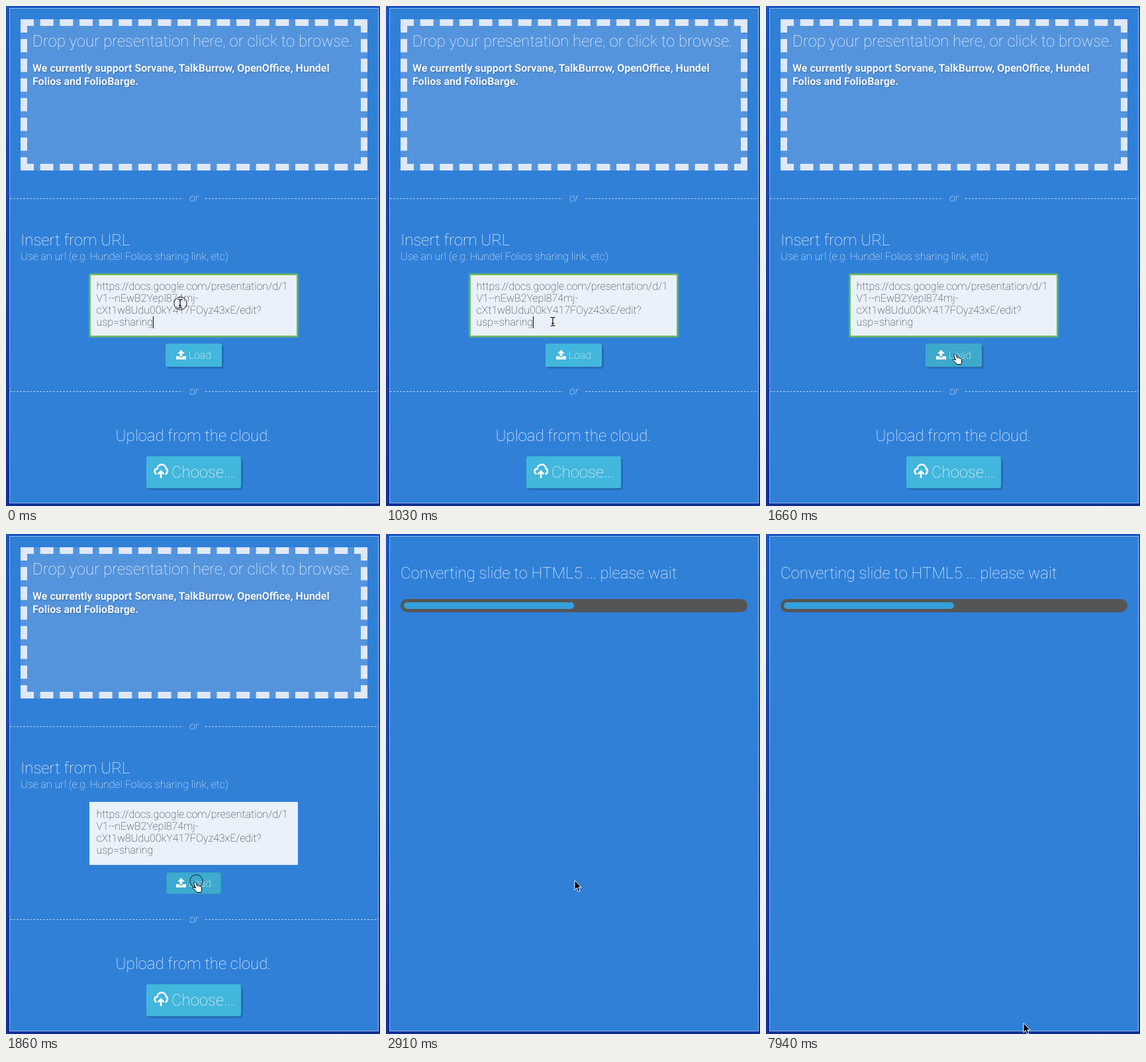
Animation, 565 px wide and 754 px high, one loop 8000 ms. Source, as an HTML page:

```html
<!DOCTYPE html>
<html lang="en">
<head>
<meta charset="utf-8">
<title>Presentation import</title>
<style>
html, body { margin: 0; width: 100%; height: 100%; overflow: hidden; }
body { background: linear-gradient(#1753be, #0f2f94); }
div, svg { position: absolute; box-sizing: border-box; }
#panel { left: 5px; top: 3px; width: 558px; height: 747px; background: #3080d8; border: 1px solid #8fbaec; }
#drop { left: 22px; top: 20px; width: 524px; height: 228px; background: #5494dd; border: 10px dashed #dfe9f7; }
#url { left: 126px; top: 404px; width: 315px; height: 95px; background: #eaf1fb; }
#url.focus { border: 2px solid #72bd5c; box-shadow: 0 0 3px #72bd5c; }
.button { background: #42b6dc; border-radius: 3px; box-shadow: 3px 3px 1px rgba(0, 0, 0, .15); }
#load { left: 241px; top: 509px; width: 85px; height: 35px; }
#load.hover { background: #3ea9cc; }
#load.press { left: 242px; top: 510px; width: 83px; height: 33px; background: #3dabd0; box-shadow: inset 0 0 2px rgba(0, 0, 0, .3); }
#choose { left: 212px; top: 679px; width: 143px; height: 48px; }
#track { left: 22px; top: 98px; width: 524px; height: 20px; border-radius: 10px; background: #555; }
#bar { left: 5px; top: 5px; height: 10px; border-radius: 5px; background: #34a1dc; }
svg { left: 0; top: 0; }
text { font: 100 16px Roboto, sans-serif; fill: #fff; text-rendering: geometricPrecision; }
.big { font-size: 24px; }
.bold { font-weight: 700; fill: #f2f7fd; filter: drop-shadow(1px 1px 1px rgba(0, 0, 0, .25)); }
.or { font-style: italic; text-anchor: middle; }
.dark text { fill: #222; }
</style>
</head>
<body>
<div id="panel"></div>

<section id="form">
  <div id="drop"></div>
  <div id="url"></div>
  <div id="load" class="button"></div>
  <div id="choose" class="button"></div>
  <svg width="565" height="754">
    <text class="big" x="40" y="61">Drop your presentation here, or click to browse.</text>
    <text class="bold" x="40" y="99">We currently support Sorvane, TalkBurrow, OpenOffice, Hundel</text>
    <text class="bold" x="40" y="119">Folios and FolioBarge.</text>
    <path d="M6 290.5H267M301 290.5H562M6 581.5H267M301 581.5H562" stroke="#b5d1f2" stroke-dasharray="3 2"/>
    <text class="or" x="284" y="295">or</text>
    <text class="or" x="284" y="586">or</text>
    <text class="big" x="22" y="361">Insert from URL</text>
    <text x="22" y="383">Use an url (e.g. Hundel Folios sharing link, etc)</text>
    <g class="dark">
      <text x="136.5" y="428">https://docs.google.com/presentation/d/1</text>
      <text x="136.5" y="446">V1--nEwB2Yepl874mj-</text>
      <text x="136.5" y="464">cXt1w8Udu00kY417FOyz43xE/edit?</text>
      <text x="136.5" y="482">usp=sharing</text>
    </g>
    <rect id="caret" x="222" y="468" width="1" height="18"/>
    <path d="M264.5 518.5L270 524H266.5V528H262.5V524H259ZM257 528H261.5V529.5H267.5V528H272V533H257Z" fill="#fff"/>
    <text x="276" y="532">Load</text>
    <text class="big" x="283" y="656" text-anchor="middle">Upload from the cloud.</text>
    <path d="M227.5 706C223 704 223.500 698 228.500 698C229 690 240 689 241.500 697C245 699 244.500 705 240.500 706M234 712V702M229.500 706L234 701.500L238.500 706" fill="none" stroke="#fff" stroke-width="2.600"/>
    <text class="big" x="250" y="711">Choose...</text>
  </svg>
</section>

<section id="wait">
  <div id="track"><div id="bar"></div></div>
  <svg width="565" height="754">
    <text class="big" x="22" y="67">Converting slide to HTML5 ... please wait</text>
  </svg>
</section>

<svg width="565" height="754">
  <circle id="ring" r="9.700" fill="none" stroke="#111"/>
  <g id="beam" fill="none">
    <path id="stem" d="M-3.500 -6.500H-1.500L0 -5.500L1.500 -6.500H3.500M-3.500 6.500H-1.500L0 5.500L1.500 6.500H3.500M0 -5.500V5.500M-2 2.500H2" stroke="#fff" stroke-width="2.600" opacity=".7"/>
    <use href="#stem" style="display:none"/>
    <path d="M-3.500 -6.500H-1.500L0 -5.500L1.500 -6.500H3.500M-3.500 6.500H-1.500L0 5.500L1.500 6.500H3.500M0 -5.500V5.500M-2 2.500H2" stroke="#000" stroke-width="1.200"/>
  </g>
  <path id="arrow" d="M1 .5V14.600L4.300 11.500L6.500 17.300L9 16.300L6.800 10.800H11.200Z" stroke="#fff"/>
  <path id="hand" d="M3.500 1.500c1-.8 2.200-.3 2.600.8L7.800 6.500c1-.5 1.900-.3 2.300.5c1-.4 1.900-.1 2.300.7c1.100-.2 1.800.2 2 1.200l.3 4.100l-1 3.500H7.600L5.600 14L1.500 10.400c-.9-.9.1-2.200 1.400-1.600L5.500 10L3 3.200C2.800 2.500 3 1.900 3.500 1.500Z" fill="#fff" stroke="#000"/>
</svg>

<script>
const LOOP = 8000;
// start time, pointer kind, x, y
const pointer = [
  [0, 'beam', 263, 449],
  [410, 'beam', 259.5, 446],
  [620, 'beam', 220.5, 420],
  [830, 'beam', 239.5, 428],
  [1030, 'beam', 252, 476],
  [1240, 'arrow', 268, 502],
  [1450, 'hand', 284, 528],
  [1660, 'hand', 281, 524],
  [2070, 'arrow', 284, 522],
  [3120, 'arrow', 285, 521],
  [3330, 'arrow', 286, 521],
  [7940, 'arrow', 388, 737]
];
const el = id => document.getElementById(id);
const show = (id, on) => { el(id).style.display = on ? '' : 'none'; };
const within = (t, from, to) => t >= from && t < to;

function draw(t) {
  const [, kind, x, y] = pointer.findLast(p => p[0] <= t);
  for (const id of ['beam', 'arrow', 'hand']) show(id, id === kind);
  el(kind).setAttribute('transform', `translate(${x} ${y})`);

  const pressed = within(t, 1860, 2070);
  show('ring', t < 210 || pressed);
  el('ring').setAttribute('transform', pressed ? 'translate(287.5 523.5)' : 'translate(263.5 448.5)');

  show('form', t < 2070);
  show('wait', t >= 2070);
  show('caret', t < 410 || within(t, 830, 1450));
  el('url').classList.toggle('focus', t < 1860);
  el('load').classList.toggle('hover', t >= 1450);
  el('load').classList.toggle('press', pressed);
  el('bar').style.width = (t < 2910 ? 51 : 257) + 'px';
}

const start = performance.now();
function tick() {
  draw((performance.now() - start) % LOOP);
  requestAnimationFrame(tick);
}
tick();
</script>
</body>
</html>
```
